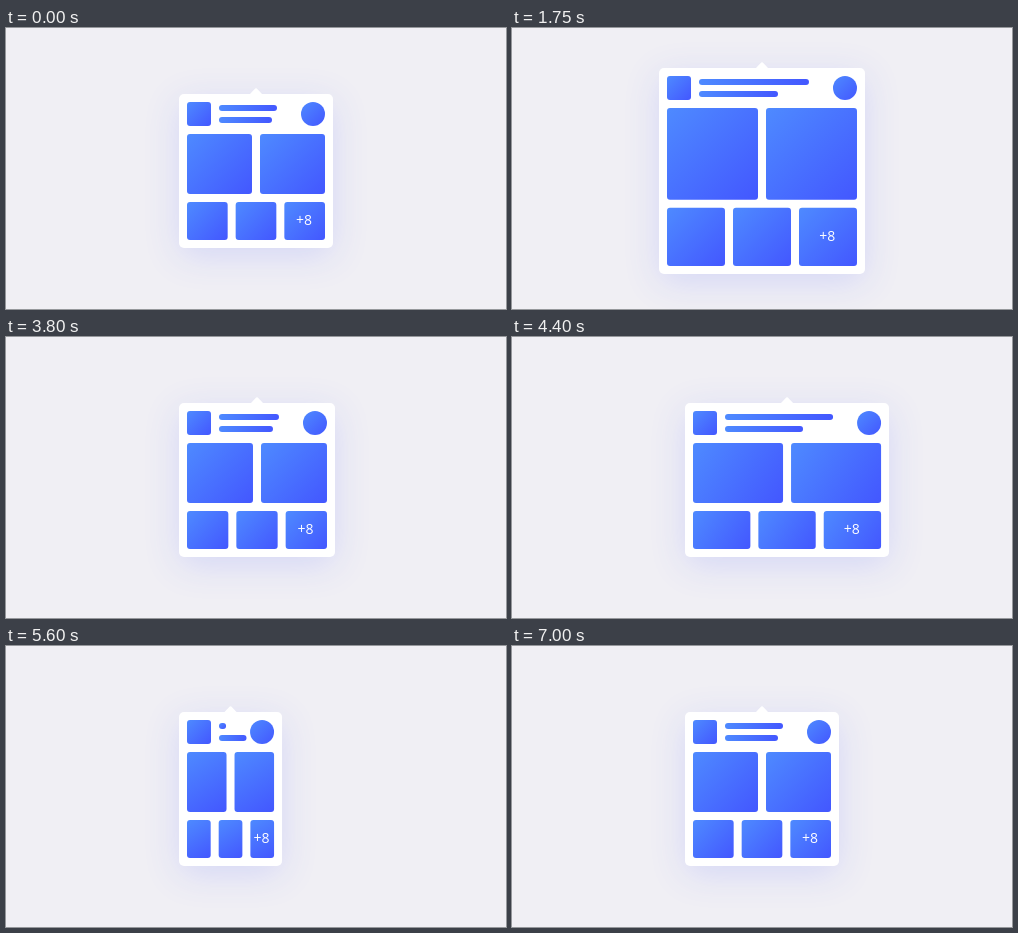
Write an HTML page with a canvas that moves like this. It is 500 by 281 pixels and loops after 7.05 s.

```html
<!DOCTYPE html>
<html lang="en">
<head>
<meta charset="utf-8">
<title>Resizing card</title>
<style>
  html, body { margin: 0; width: 100%; height: 100%; overflow: hidden; background: #f0eff4; }
  canvas { display: block; }
</style>
</head>
<body>
<canvas id="stage" width="500" height="281"></canvas>
<script>
const ctx = document.getElementById('stage').getContext('2d');
const LOOP = 7050, STEP = 50, MOVE = 1000;
const REST = 154, LEFT = 173, MIDDLE_Y = 143;
const PAD = 8, ICON = 24, HEADER = PAD + ICON + PAD;

// Cubic Bezier (.42, 0, .58, 1), solved for x by bisection
function ease(x) {
  if (x <= 0) return 0;
  if (x >= 1) return 1;
  let low = 0, high = 1, u = 0.5;
  for (let i = 0; i < 24; i++) {
    u = (low + high) / 2;
    const bx = 3 * u * (1 - u) * (0.42 * (1 - u) + 0.58 * u) + u ** 3;
    if (bx < x) low = u; else high = u;
  }
  return u * u * (3 - 2 * u);
}

// Adds up eased changes given as [start time, amount]
const track = (t, moves) =>
  moves.reduce((sum, [start, amount]) => sum + amount * ease((t - start) / MOVE), 0);

const growth = t => track(t, [[637, 52], [1740, -52]]);
const stretch = t => track(t, [[3670, 59], [4670, -111], [5690, 52]]);

function block(x, y, w, h, radius) {
  const fill = ctx.createLinearGradient(x, y, x + w, y + h);
  fill.addColorStop(0, '#4e8aff');
  fill.addColorStop(1, '#4357ff');
  ctx.fillStyle = fill;
  ctx.beginPath();
  ctx.roundRect(x, y, w, h, radius);
  ctx.fill();
}

function panel(x, y, w, h) {
  ctx.fillStyle = '#fff';
  ctx.save();
  ctx.shadowColor = 'rgba(70, 90, 255, 0.17)';
  ctx.shadowBlur = 36;
  ctx.shadowOffsetY = 8;
  ctx.beginPath();
  ctx.roundRect(x, y, w, h, 5);
  ctx.fill();
  ctx.restore();

  const cx = x + w / 2;
  ctx.beginPath();
  ctx.moveTo(cx - 6.5, y + 0.5);
  ctx.lineTo(cx - 0.8, y - 5.4);
  ctx.quadraticCurveTo(cx, y - 6, cx + 0.8, y - 5.4);
  ctx.lineTo(cx + 6.5, y + 0.5);
  ctx.fill();
}

function row(count, x, y, w, h) {
  const tile = (w - PAD * (count - 1)) / count;
  for (let i = 0; i < count; i++) block(x + i * (tile + PAD), y, tile, h, 3);
  return tile;
}

function draw(t) {
  const grow = growth(t);
  const w = REST + grow + stretch(t), h = REST + grow;
  const x = LEFT - grow / 2, y = MIDDLE_Y - h / 2;
  const left = x + PAD, right = x + w - PAD;

  ctx.fillStyle = '#f0eff4';
  ctx.fillRect(0, 0, 500, 281);
  panel(x, y, w, h);

  block(left, y + PAD, ICON, ICON, 3);
  block(right - ICON, y + PAD, ICON, ICON, ICON / 2);
  block(x + HEADER, y + 11, w - 96, 6, 3);
  block(x + HEADER, y + 23, 53 + (w - REST) / 2, 6, 3);

  const space = h - HEADER - 2 * PAD;
  const big = space * 60 / 98, small = space - big;
  const lower = y + HEADER + big + PAD;
  row(2, left, y + HEADER, right - left, big);
  const tile = row(3, left, lower, right - left, small);

  ctx.fillStyle = '#fff';
  ctx.font = '14px "Open Sans", sans-serif';
  ctx.textAlign = 'center';
  ctx.fillText('+8', right - tile / 2 - 0.7, lower + small / 2 + 4);
}

function tick() {
  const t = performance.now() % LOOP;
  draw(Math.floor(t / STEP) * STEP);
  requestAnimationFrame(tick);
}
tick();
</script>
</body>
</html>
```
